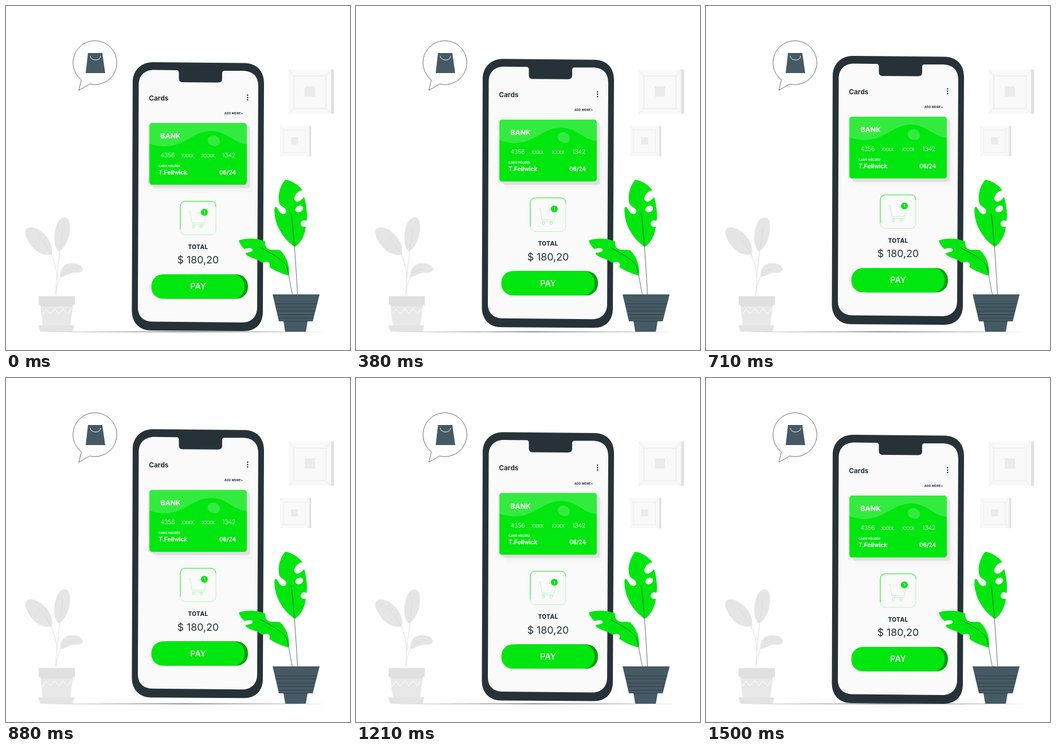
These frames come from a looping animation (600x600 px, 1.54 s). An HTML page:

```html
<!DOCTYPE html>
<html lang="en">
<head>
<meta charset="utf-8">
<title>Card payment</title>
<style>
  html, body { margin: 0; height: 100%; overflow: hidden; background: #fff; }
  svg { display: block; width: 100vw; height: 100vh; font-family: Inter, "Open Sans", sans-serif; }
  .green { fill: #00e60f; }
  .dark { fill: #263238; }
  .slate { fill: #455a64; }
  .line { fill: none; stroke: #263238; stroke-width: .7; }
  .pale { fill: none; stroke: #e4e4e4; stroke-width: .8; }
  .cart { fill: none; stroke: #00e60f; stroke-width: .6; }
  .bold { font-weight: 700; }
  .light { font-weight: 300; font-size: 10.4px; }
  .mid { text-anchor: middle; }
</style>
</head>
<body>
<svg viewBox="0 0 600 600">
  <!-- wall frames -->
  <g id="frame">
    <path fill="#f9f9f9" d="M493 111h74v77h-74z"/>
    <path fill="#e0e0e0" d="M567 111h5v77h-5z"/>
    <path class="pale" d="M502 122h56v57h-56zM493 111l9 11M567 111l-9 11M493 188l9-9M567 188l-9-9"/>
    <path fill="#ebebeb" d="M521 140h18v18h-18z"/>
  </g>
  <use href="#frame" transform="translate(478 209) scale(.687) translate(-493 -111)"/>

  <!-- pale plant -->
  <g fill="#e5e5e5">
    <path d="M80 433C85 415 65 388 44 386C28 386 33 402 42 415C52 430 68 437 80 433Z"/>
    <path d="M92 428C82 420 82 395 90 378C96 367 106 366 110 374C115 390 108 420 92 428Z"/>
    <path d="M95 472C94 455 105 447 118 449C130 449 136 457 133 462C129 467 120 464 113 466C107 468 101 473 95 472Z"/>
    <path fill="none" stroke="#d8d8d8" stroke-width=".8" d="M87 504C87 480 92 440 99 388M57 402C78 425 88 450 89 475M87 503C90 475 98 462 116 459"/>
    <path fill="#e8e8e8" d="M60 521h57l-5 36H64z"/>
    <path fill="#e0e0e0" d="M57 506h63v15H57zM60 521h57l-.5 3h-56z"/>
    <path fill="none" stroke="#fff" d="M63 538l7-9 7 8 8-9 7 9 8-9 7 9 7-9"/>
    <path fill="#e3e3e3" d="M56 557h63l-3 11H60z"/>
  </g>

  <!-- speech bubble with bag -->
  <path class="line" d="M131.500 128.900A38.200 38.200 0 1 1 146.200 136L127 147Z"/>
  <path class="slate" d="M143 82h25l5 35h-34z"/>
  <path fill="none" stroke="#fff" d="M147 87C147 96 165 97 165 87"/>

  <!-- floor -->
  <path class="dark" d="M58 568.200L309 567.700L560 568.200L309 568.700Z"/>

  <g id="phone">
    <path class="dark" d="M221 124C221 103 236 89 256 89L416 90.500C437 91 450 104 450 126L448 524C448 545 436 558 415 558L254 557C233 557 219.500 544 219.500 522Z"/>
    <path fill="#fafafa" d="M231.500 129C231.500 112 242 102.500 258 102.500L298 103Q301 103 301.500 107V118Q302 124 308 124L370 124.500Q377 124.500 377 118V108Q377 104 381 104L412 104C430 104 440 113 440 131L438 517C438 533 428 543 412 543L255 541.500C239 541 230 532 230 516Z"/>

    <text class="dark bold" x="249.300" y="155.600" font-size="11.800">Cards</text>
    <g class="dark">
      <circle cx="421.300" cy="146.500" r="1.250"/>
      <circle cx="421.300" cy="150.600" r="1.250"/>
      <circle cx="421.300" cy="154.700" r="1.250"/>
    </g>
    <text class="dark bold" x="413" y="180" font-size="5.300" text-anchor="end">ADD MORE+</text>

    <rect x="260" y="206" width="170" height="110" rx="4" fill="#f5f5f5"/>
    <rect x="256" y="200.500" width="169.500" height="108" rx="4" fill="#e0e0e0"/>
    <rect class="green" x="250" y="195" width="170" height="107.800" rx="4.500"/>
    <g fill="#fff">
      <path opacity=".2" d="M250 199.500Q250 195 254.500 195H415.500Q420 195 420 199.500V232C398 231 385 209 358 209C327 209 312 235 278 236C266 236 257 233 250 231Z"/>
      <path opacity=".2" d="M352 227C350 220 358 216 364 217C371 219 374 225 373 230C371 236 365 236 361 235C356 234 353 231 352 227Z"/>
      <text class="bold" x="269.500" y="222" font-size="12.200">BANK</text>
      <g class="light">
        <text x="269.500" y="255">4356</text>
        <text x="305.500" y="255">xxxx</text>
        <text x="341.500" y="255">xxxx</text>
        <text x="400.500" y="255" text-anchor="end">1342</text>
      </g>
      <text class="bold" x="266" y="271.500" font-size="5.400">CARS HOLDER</text>
      <text class="bold" x="266" y="284.700" font-size="10.200">T.Fellwick</text>
      <text class="bold" x="401" y="284.700" font-size="9.700" text-anchor="end">06/24</text>
    </g>

    <g class="cart">
      <rect x="304" y="331.500" width="62" height="58.500" rx="9" opacity=".5"/>
      <path stroke-width=".8" d="M304 381V340.500Q304 331.500 313 331.500H357Q366 331.500 366 340.500"/>
      <path opacity=".4" d="M318.500 350H321L324.500 369.500H346L348.500 358M333 352H341M325 372.500H346"/>
      <circle cx="327" cy="375.500" r="2.200" opacity=".6"/>
      <circle cx="340.500" cy="375.500" r="2.200" opacity=".6"/>
    </g>
    <circle class="green" cx="346" cy="350.700" r="6"/>
    <text class="bold mid" x="345.800" y="353" font-size="6.500" fill="#fff">1</text>

    <text class="dark mid" x="335" y="414.500" font-size="10.200" font-weight="800" letter-spacing=".3">TOTAL</text>
    <text class="dark mid" x="335" y="440.300" font-size="17.800">$ 180,20</text>

    <rect x="262" y="459" width="160" height="42.500" rx="20" fill="#00a10b"/>
    <rect class="green" x="253.500" y="459" width="162.500" height="42.500" rx="20"/>
    <text class="mid" x="335" y="485.300" font-size="14.500" font-weight="500" fill="#fff">PAY</text>
  </g>

  <!-- green plant -->
  <path class="green" d="M487 303C497 304 509 311 517 321.500C509 322 502 330 503 338C507 344 514 341 520 333C525 350 526 368 524 375C519 372 513 375 514 381C515 385 519 386 523 385C521 400 515 412 504 420C490 412 472 390 469 366C467 352 469 349 472 351C474 353 475 357 478 360C484 366 489 362 489 357C488 352 480 350 477 345C473 330 478 314 487 303Z"/>
  <ellipse cx="511.500" cy="354" rx="7" ry="5.500" fill="#fff" transform="rotate(-28 511.500 354)"/>
  <path class="green" d="M406 409C420 404 440 405 452 411C452 415 452 419 456 423C463 427 470 424 478 426C490 437 496 455 493 470C480 467 466 460 459 455C462 451 460 447 455 446C450 446 448 449 445 447C437 440 426 440 418 433C417 429 426 431 430 427C432 422 424 421 416 424C411 420 408 415 406 409Z"/>
  <path class="line" d="M497.500 361C501 390 504 425 508.500 503M443 421C460 430 478 439 488 451C493 460 495 485 499.500 503"/>
  <path class="slate" d="M465 503h82l-12 47h-9l-3 18h-36l-3-18h-8z"/>
  <path class="line" d="M470 519.500H542M471 525H540M473 532H539M474 538.500H537M476 544.500H536M484 550H526"/>
</svg>
<script>
  const STEP = 1000 / 24, STEPS = 37, LOOP = 1540;
  const phone = document.getElementById("phone");

  // The phone floats up and down at constant speed, 24 poses a second.
  function draw(now) {
    const step = Math.min(STEPS - 1, Math.floor((now % LOOP + 4.9) / STEP));
    const y = 12 * Math.abs(step - 17.2) / 18.5 - 2.1;
    phone.setAttribute("transform", `translate(0 ${y.toFixed(2)})`);
  }

  const start = performance.now();
  function tick() {
    draw(performance.now() - start);
    requestAnimationFrame(tick);
  }
  tick();
</script>
</body>
</html>
```
